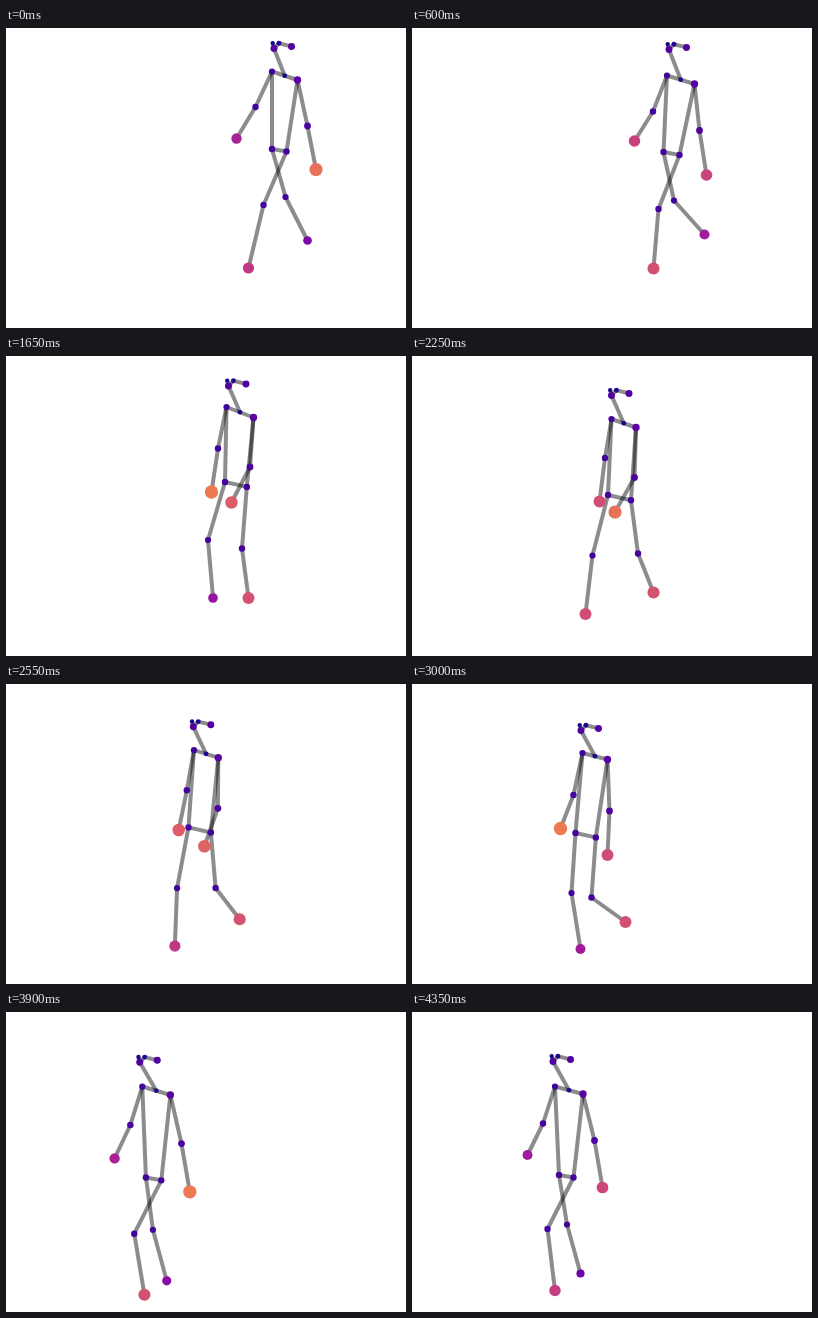
An HTML page with a canvas for the animation above (4500 ms loop, 400x300 px).

```html
<!DOCTYPE html>
<html>
<head>
<meta charset="utf-8">
<style>
html, body { margin: 0; width: 100%; height: 100%; overflow: hidden; background: #fff; }
canvas { display: block; }
</style>
</head>
<body>
<canvas id="stage" width="400" height="300"></canvas>
<script>
const ctx = document.getElementById('stage').getContext('2d');
const STEP = 150, STEPS = 30;
const KEYS = [0, 1, 4, 11, 15, 20, 24, 27, 29];

// The walker sways outward shortly after the start and before the end.
function withSway(list, startShift, endShift) {
  const first = list[0], last = list[6];
  return [first, first + startShift, ...list.slice(1, 6), last + endShift(last), last];
}

const still = () => 0;
const track = (xs, ys, weight) => ({
  x: withSway(xs, 5.5, () => -10.5),
  y: withSway(ys, -1, y => (y - 20) * 0.038),
  weight: Array.isArray(weight) ? withSway(weight, 0, still) : weight
});

const upper = {
  nose: track([268, 257, 222.5, 199.5, 169, 146, 141], [20.5, 21.5, 30, 39.5, 46.5, 49, 49.5], 0.14),
  shoulderR: track([266, 255, 220.5, 199.5, 170.5, 149.5, 143], [43.5, 47.5, 51, 63, 69, 69.5, 74.5], 0.1),
  shoulderL: track([291.5, 282.5, 247.5, 224, 195.5, 177.5, 171], [52, 56, 61.5, 71.5, 75.5, 79, 82], 0.16),
  elbowR: track([249.5, 241, 212, 193, 161.5, 138, 131], [79, 83.5, 92.5, 102, 111, 108, 111.5], 0.11),
  elbowL: track([301.5, 287.5, 244, 222.5, 197.5, 187, 182.5], [98, 102.5, 111, 121.5, 127, 128, 128.5], 0.13),
  wristR: track([230.5, 222.5, 205.5, 187.5, 148.5, 122, 115.5], [110.5, 113, 136, 145.5, 144.5, 142.5, 143],
    [0.37, 0.48, 0.67, 0.52, 0.67, 0.42, 0.35]),
  wristL: track([310, 294.5, 225.5, 203, 195.5, 195, 190.5], [141.5, 147, 146.5, 156, 171, 174.5, 175.5],
    [0.64, 0.49, 0.57, 0.64, 0.52, 1, 0.5])
};

const lower = {
  hipR: track([266, 251.5, 219, 196, 163.5, 151.5, 147], [121, 124, 126, 139, 149, 157, 163], 0.11),
  kneeR: track([279.5, 262, 202, 180.5, 159.5, 155.5, 155], [169, 172.5, 184, 199.5, 209, 211, 212.5], 0.1),
  kneeL: track([257.5, 246.5, 236, 226, 179.5, 142, 135.5], [177, 181, 192.5, 197.5, 213.5, 213.5, 217], 0.11),
  ankleR: track([301.5, 292.5, 207, 173.5, 168.5, 169.5, 168.5], [212.5, 206.5, 242, 258, 265, 262.5, 261.5],
    [0.25, 0.35, 0.32, 0.52, 0.35, 0.43, 0.21]),
  ankleL: track([242.5, 241.5, 242.5, 241.5, 213.5, 159.5, 143], [240, 240.5, 242, 236.5, 238, 265, 278.5],
    [0.45, 0.53, 0.53, 0.54, 0.53, 0.66, 0.47])
};

const BONES = [
  'eyeR nose', 'nose eyeL', 'eyeL ear', 'nose neck', 'shoulderR neck', 'neck shoulderL',
  'shoulderR elbowR', 'elbowR wristR', 'shoulderL elbowL', 'elbowL wristL',
  'shoulderR hipR', 'shoulderL hipL', 'hipR hipL',
  'hipR kneeR', 'kneeR ankleR', 'hipL kneeL', 'kneeL ankleL'
].map(pair => pair.split(' '));

const PALETTE = ['0d0887', '41049d', '6a00a8', '8f0da4', 'b12a90', 'cc4778',
  'e16462', 'f2844b', 'fca636', 'fcce25', 'f0f921']
  .map(hex => [0, 2, 4].map(i => parseInt(hex.slice(i, i + 2), 16)));

function segment(t) {
  let i = 0;
  while (i < KEYS.length - 2 && t >= KEYS[i + 1]) i++;
  const span = KEYS[i + 1] - KEYS[i];
  return { i, span, u: (t - KEYS[i]) / span };
}

function slope(values, i) {
  const a = Math.max(0, i - 1), b = Math.min(KEYS.length - 1, i + 1);
  return (values[b] - values[a]) / (KEYS[b] - KEYS[a]);
}

function smooth(values, t) {
  const { i, span, u } = segment(t), v = 1 - u;
  return values[i] * v * v * (1 + 2 * u) + values[i + 1] * u * u * (3 - 2 * u)
    + span * u * v * (slope(values, i) * v - slope(values, i + 1) * u);
}

function linear(values, t) {
  const { i, u } = segment(t);
  return values[i] + (values[i + 1] - values[i]) * u;
}

const offset = (p, x, y, weight) => ({ x: p.x + x, y: p.y + y, weight });

function poseAt(t) {
  const pose = {};
  for (const [name, { x, y, weight }] of Object.entries({ ...upper, ...lower })) {
    pose[name] = {
      x: smooth(x, t), y: smooth(y, t),
      weight: Array.isArray(weight) ? linear(weight, t) : weight
    };
  }
  const { nose, shoulderR, shoulderL, hipR } = pose;
  const turn = Math.sin(Math.PI * t / (STEPS - 1)) ** 2;
  pose.eyeR = offset(nose, -1.3, -5.4, 0.02);
  pose.eyeL = offset(nose, 4.9, -5.2, 0.04);
  pose.ear = offset(nose, 17.5, -2.1, 0.14);
  pose.neck = {
    x: (shoulderR.x + shoulderL.x) / 2, y: (shoulderR.y + shoulderL.y) / 2, weight: 0.03
  };
  pose.hipL = offset(hipR, 14.5 + 8.5 * turn, 2.5 + 2.8 * turn, 0.11);
  return pose;
}

function colour(weight) {
  const pos = weight * 10, i = Math.min(9, Math.floor(pos));
  const rgb = PALETTE[i].map((c, k) => Math.round(c + (PALETTE[i + 1][k] - c) * (pos - i)));
  return `rgb(${rgb})`;
}

function draw(pose) {
  ctx.fillStyle = '#fff';
  ctx.fillRect(0, 0, 400, 300);
  ctx.lineWidth = 4;
  ctx.strokeStyle = 'rgba(0,0,0,0.45)';
  for (const [a, b] of BONES) {
    ctx.beginPath();
    ctx.moveTo(pose[a].x, pose[a].y);
    ctx.lineTo(pose[b].x, pose[b].y);
    ctx.stroke();
  }
  for (const { x, y, weight } of Object.values(pose)) {
    ctx.fillStyle = colour(weight);
    ctx.beginPath();
    ctx.arc(x, y, Math.sqrt(3.5 + 62 * weight), 0, 2 * Math.PI);
    ctx.fill();
  }
}

const start = performance.now();
function tick() {
  const elapsed = Math.max(0, performance.now() - start);
  draw(poseAt(Math.floor(elapsed / STEP) % STEPS));
  requestAnimationFrame(tick);
}
tick();
</script>
</body>
</html>
```
